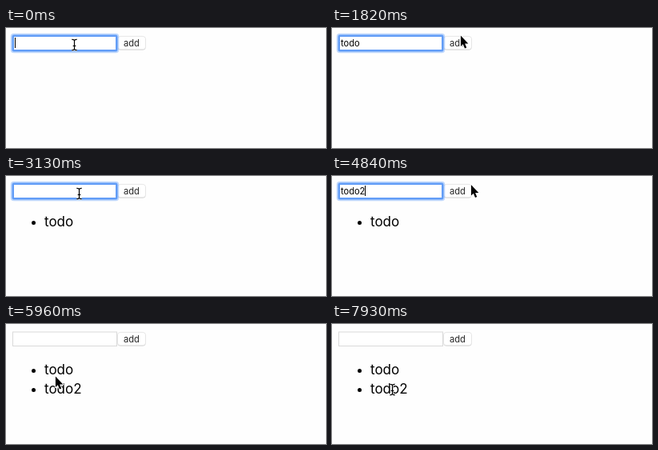
These frames come from a looping animation (400x150 px, 8 s). An HTML page:

```html
<!DOCTYPE html>
<html lang="en">
<head>
<meta charset="utf-8">
<title>Todo list</title>
<style>
  html, body { margin: 0; width: 100%; height: 100%; overflow: hidden; background: #fefefe; }
  svg { display: block; width: 400px; height: 150px; }
  .ui { font: 11.1px Inter, "Liberation Sans", sans-serif; }
  .list { font: 17px Inter, "Liberation Sans", sans-serif; }
  .halo { fill: none; stroke: #fff; stroke-width: 2.8; stroke-opacity: .85; }
  .stem { fill: none; stroke: #000; stroke-width: 1.2; }
  .arrow { stroke: #fff; stroke-width: 2; paint-order: stroke; stroke-linejoin: round; }
</style>
</head>
<body>
<svg viewBox="0 0 400 150">
  <defs>
    <path id="beam" d="M-3.2-6.6Q0-6.8 0-4.6V4.6Q0 6.8-3.2 6.6M3.2-6.6Q0-6.8 0-4.6M0 4.6Q0 6.8 3.2 6.6M-1.8 1.4H1.8"/>
  </defs>

  <rect x="8.5" y="10" width="130" height="17.5" fill="#fff" stroke="#dadada"/>
  <g id="button">
    <rect x="139.5" y="11" width="35" height="16.6" rx="3.5" fill="#cacaca"/>
    <rect x="139.5" y="10.4" width="35" height="16.4" rx="3.5" fill="#fff" stroke="#e2e2e2" stroke-width=".8"/>
    <text class="ui" x="147" y="23" fill="#222">add</text>
  </g>
  <g id="ring" fill="none" stroke="#629df7">
    <rect x="7.75" y="8.75" width="131.5" height="20.5" rx="2" stroke-width="4" stroke-opacity=".4"/>
    <rect x="8.75" y="9.75" width="129.5" height="18.5" rx="1" fill="#fff" stroke-width="2.5"/>
  </g>
  <text class="ui" id="typed" x="11" y="23"></text>
  <rect id="caret" x="11" y="12" width="1" height="13"/>

  <g class="list">
    <g id="first">
      <circle cx="34.5" cy="58.4" r="2.5"/>
      <text x="48" y="63">todo<tspan id="done"> completed</tspan></text>
    </g>
    <g id="second">
      <circle cx="34.5" cy="82.4" r="2.5"/>
      <text x="48" y="87">todo2</text>
    </g>
  </g>

  <g id="text-cursor"><use href="#beam" class="halo"/><use href="#beam" class="stem"/></g>
  <path id="arrow-cursor" class="arrow" d="M.4 .6V14L3.3 11.3L5.5 16.4L7.7 15.5L5.6 10.4H9.8Z"/>
</svg>

<script>
const LOOP = 8000;
const get = id => document.getElementById(id);
const [ring, typed, caret, first, second, done, beam, arrow] =
  ['ring', 'typed', 'caret', 'first', 'second', 'done', 'text-cursor', 'arrow-cursor'].map(get);

// [start ms, text in the field]
const typing = [
  [0, ''], [470, 't'], [580, 'to'], [940, 'tod'], [1060, 'todo'], [2060, ''],
  [3250, 't'], [3360, 'to'], [3660, 'tod'], [4020, 'to'], [4140, 'tod'],
  [4250, 'todo'], [4550, 'todo2'], [5420, '']
];

// [start ms, pointer shape, x, y]
const I = beam, A = arrow;
const pointer = [
  [0, I, 85.5, 21],
  [1470, I, 100, 19], [1530, I, 126, 17], [1590, A, 145, 14],
  [1650, A, 154, 11], [1710, A, 158, 10], [1820, A, 160.5, 9],
  [2300, A, 150, 11], [2360, I, 128, 18], [2420, I, 102, 21], [2470, I, 91.5, 22],
  [4730, I, 116, 19], [4790, A, 154, 13], [4840, A, 173.5, 10.5],
  [4960, A, 171, 13], [5020, A, 162, 17], [5070, A, 155, 19.5], [5120, A, 152.5, 20.5],
  [5780, A, 140, 27], [5840, A, 108, 45], [5900, A, 76, 60], [5960, A, 61.5, 65],
  [6080, A, 56.5, 65], [6140, I, 60, 62], [6200, I, 66.5, 60.5], [6260, I, 70.5, 60.5],
  [7570, A, 69.5, 69.5], [7630, A, 68.5, 68.5],
  [7870, I, 73, 80], [7930, I, 75.5, 82]
];

const latest = (steps, t) => steps.findLast(step => step[0] <= t);
const within = (t, ...spans) => spans.some(([from, to]) => t >= from && t < to);
const show = (el, on) => el.setAttribute('visibility', on ? 'visible' : 'hidden');

function draw(t) {
  const text = latest(typing, t)[1];
  if (typed.textContent !== text) typed.textContent = text;
  const width = text ? typed.getComputedTextLength() : 0;
  caret.setAttribute('x', 11 + Math.round(width));

  show(ring, within(t, [0, 2060], [2650, 5420]));
  show(caret, within(t, [0, 110], [470, 1590], [2650, 3130], [3250, 5020]));
  show(first, t >= 2060);
  show(second, t >= 5420);
  show(done, within(t, [6440, 7090]));

  const [, shape, x, y] = latest(pointer, t);
  show(beam, shape === beam);
  show(arrow, shape === arrow);
  shape.setAttribute('transform', `translate(${x} ${y})`);
}

const start = performance.now();
function tick() {
  draw((performance.now() - start) % LOOP);
  requestAnimationFrame(tick);
}
tick();
</script>
</body>
</html>
```
